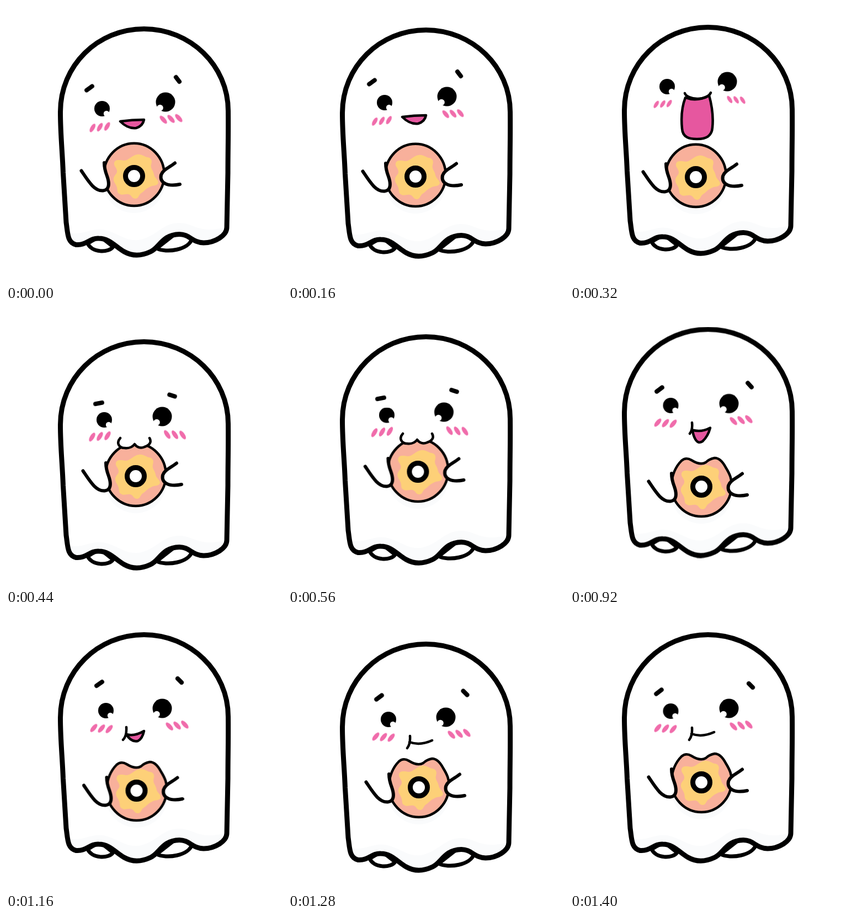
Recreate the animation shown at these times as an HTML page. Size 500 px wide and 500 px high, loop 1600 ms.

```html
<!DOCTYPE html>
<html lang="en">
<head>
<meta charset="utf-8">
<title>Ghost eating a donut</title>
<style>
html, body { margin: 0; width: 100%; height: 100%; overflow: hidden; background: #fff; }
svg { display: block; width: 100vw; height: 100vh; }

.line { fill: none; stroke: #000; stroke-linecap: round; stroke-linejoin: round; }
.white { fill: #fff; }
.tongue { fill: #e6579f; }
.shade { fill: #fafbfc; }
.cheek { fill: #f06cab; }

/* every part holds its pose until the next key */
.part { animation: 1600ms step-end infinite; }
#body { animation-name: body; }
#eyeL { animation-name: eyeL; }
#eyeR { animation-name: eyeR; }
#brows { animation-name: brows; }
#browL { animation-name: browL; }
#browR { animation-name: browR; }
#cheekL { animation-name: cheekL; }
#cheekR { animation-name: cheekR; }
#snack { animation-name: snack; }
#mouth { animation-name: mouth; }
#whole { animation-name: whole; }
#bitten { animation-name: bitten; }
#grin { animation-name: grin; }
#gape { animation-name: gape; }
#bite { animation-name: bite; }
#chew { animation-name: chew; }
#munch { animation-name: munch; }
#smile { animation-name: smile; }

@keyframes body {
  0% { transform: translateY(2px) }
  10% { transform: translateY(4px) }
  15% { transform: translateY(1px) }
  20% { transform: translateY(-1px) }
  27.5% { transform: translateY(18px) }
  35% { transform: translateY(9px) }
  42.5% { transform: none }
  50% { transform: translateY(14px) }
  57.5% { transform: translateY(-4.5px) }
  65% { transform: translateY(13px) }
  72.5% { transform: translateY(-2px) }
  80% { transform: translateY(15px) }
  87.5%, 100% { transform: translateY(-2px) }
}
@keyframes eyeL {
  0% { transform: translate(174px, 186px) }
  10% { transform: translate(175px, 175px) }
  15% { transform: translate(175px, 160px) }
  20% { transform: translate(176px, 146px) }
  27.5% { transform: translate(178px, 199px) }
  35% { transform: translate(179px, 190.5px) }
  42.5% { transform: translate(182px, 178px) }
  50% { transform: translate(182px, 191px) }
  57.5% { transform: translate(182.5px, 173px) }
  65% { transform: translate(182px, 190px) }
  72.5% { transform: translate(181px, 175px) }
  80% { transform: translate(182px, 191px) }
  87.5%, 100% { transform: translate(182.5px, 176px) }
}
@keyframes eyeR {
  0% { transform: translate(289px, 174px) }
  10% { transform: translate(288px, 164px) }
  15% { transform: translate(286px, 150px) }
  20% { transform: translate(285px, 137px) }
  27.5% { transform: translate(283px, 193px) }
  35% { transform: translate(282.5px, 185px) }
  42.5% { transform: translate(288px, 173px) }
  50% { transform: translate(288px, 186px) }
  57.5% { transform: translate(288px, 169.5px) }
  65% { transform: translate(286px, 186px) }
  72.5% { transform: translate(283px, 171px) }
  80% { transform: translate(286px, 187px) }
  87.5%, 100% { transform: translate(288px, 171px) }
}
@keyframes brows { 0% { opacity: 1 } 15% { opacity: 0 } 27.5%, 100% { opacity: 1 } }
@keyframes browL {
  0% { transform: translate(151px, 149px) rotate(-36deg) }
  10% { transform: translate(152px, 138px) rotate(-36deg) }
  27.5% { transform: translate(168px, 169px) rotate(-11deg) }
  35% { transform: translate(168px, 160px) rotate(-11deg) }
  42.5% { transform: translate(161px, 142.5px) rotate(-38deg) }
  50% { transform: translate(161px, 156px) rotate(-36deg) }
  57.5% { transform: translate(162px, 144px) rotate(-37deg) }
  65% { transform: translate(165px, 151px) rotate(-35deg) }
  72.5% { transform: translate(169px, 126.5px) rotate(-35deg) }
  80% { transform: translate(165px, 151px) rotate(-37deg) }
  87.5%, 100% { transform: translate(161px, 141px) rotate(-38deg) }
}
@keyframes browR {
  0% { transform: translate(311px, 133px) rotate(53deg) }
  10% { transform: translate(310px, 123px) rotate(53deg) }
  27.5% { transform: translate(301px, 155px) rotate(18deg) }
  35% { transform: translate(301px, 146.5px) rotate(18deg) }
  42.5% { transform: translate(327.5px, 131.5px) rotate(45deg) }
  50% { transform: translate(327px, 146px) rotate(46deg) }
  57.5% { transform: translate(325.5px, 136px) rotate(48deg) }
  65% { transform: translate(320px, 144px) rotate(46deg) }
  72.5% { transform: translate(314.5px, 120.5px) rotate(45deg) }
  80% { transform: translate(321px, 143px) rotate(45deg) }
  87.5%, 100% { transform: translate(327.5px, 129.5px) rotate(45deg) }
}
@keyframes cheekL {
  0% { transform: translate(170px, 219.5px) rotate(-6deg) scale(.95) }
  10% { transform: translate(170px, 208px) rotate(-6deg) scale(.92) }
  15% { transform: translate(169px, 193px) rotate(-5deg) scale(.88) }
  20% { transform: translate(168px, 177.5px) rotate(-4deg) scale(.84) }
  27.5% { transform: translate(170px, 229px) rotate(-5deg) }
  35% { transform: translate(170.5px, 221px) rotate(-5deg) }
  42.5% { transform: translate(173px, 209.5px) rotate(4deg) }
  50% { transform: translate(173px, 223px) rotate(4deg) }
  57.5% { transform: translate(173px, 205px) rotate(4deg) }
  65% { transform: translate(173px, 222px) rotate(4deg) }
  72.5% { transform: translate(173px, 207.5px) rotate(4deg) }
  80% { transform: translate(173px, 223px) rotate(4deg) }
  87.5%, 100% { transform: translate(173px, 207.5px) rotate(4deg) }
}
@keyframes cheekR {
  0% { transform: translate(299px, 204.5px) rotate(-6deg) }
  10% { transform: translate(299px, 195px) rotate(-4deg) scale(.95) }
  15% { transform: translate(300px, 183px) rotate(0deg) scale(.9) }
  20% { transform: translate(301px, 170px) rotate(3deg) scale(.84) }
  27.5% { transform: translate(306px, 226px) rotate(2deg) }
  35% { transform: translate(306.5px, 219px) rotate(2deg) }
  42.5% { transform: translate(310px, 204px) rotate(-7deg) }
  50% { transform: translate(310px, 217px) rotate(-7deg) }
  57.5% { transform: translate(310px, 199.5px) rotate(-7deg) }
  65% { transform: translate(310px, 216px) rotate(-7deg) }
  72.5% { transform: translate(310px, 202px) rotate(-7deg) }
  80% { transform: translate(310px, 217px) rotate(-7deg) }
  87.5%, 100% { transform: translate(310px, 202px) rotate(-7deg) }
}
@keyframes snack {
  0% { transform: translate(232px, 308px) }
  10% { transform: translate(231px, 309px) }
  15% { transform: translate(229px, 310px) }
  20% { transform: translate(228px, 310px) }
  27.5% { transform: translate(235px, 301px) }
  35% { transform: translate(235.4px, 293px) }
  42.5% { transform: translate(238px, 307px) }
  50% { transform: translate(238px, 317px) }
  57.5% { transform: translate(238px, 320px) }
  65% { transform: translate(237px, 323px) }
  72.5% { transform: translate(236.5px, 320px) }
  80% { transform: translate(237px, 314px) }
  87.5%, 100% { transform: translate(238px, 305px) }
}
@keyframes mouth {
  0% { transform: none }
  10% { transform: translateY(-8px) }
  15% { transform: translate(58px, 58px) scale(.75) }
  20% { transform: none }
  27.5% { transform: translate(-1px, 8px) }
  35% { transform: none }
  42.5% { transform: none }
  50% { transform: translateY(13px) }
  57.5% { transform: none }
  65% { transform: translateY(12px) }
  72.5% { transform: none }
  80% { transform: translateY(13px) }
  87.5%, 100% { transform: translateY(-2px) }
}
@keyframes whole { 0% { opacity: 1 } 42.5%, 100% { opacity: 0 } }
@keyframes bitten { 0% { opacity: 0 } 42.5%, 100% { opacity: 1 } }
@keyframes grin { 0% { opacity: 1 } 15%, 100% { opacity: 0 } }
@keyframes gape { 0% { opacity: 0 } 15% { opacity: 1 } 27.5%, 100% { opacity: 0 } }
@keyframes bite { 0% { opacity: 0 } 27.5% { opacity: 1 } 42.5%, 100% { opacity: 0 } }
@keyframes chew {
  0% { opacity: 0 } 42.5% { opacity: 1 } 57.5% { opacity: 0 }
  65% { opacity: 1 } 72.5% { opacity: 0 } 80%, 100% { opacity: 1 }
}
@keyframes munch { 0% { opacity: 0 } 57.5% { opacity: 1 } 65%, 100% { opacity: 0 } }
@keyframes smile { 0% { opacity: 0 } 72.5% { opacity: 1 } 80%, 100% { opacity: 0 } }
</style>
</head>
<body>
<svg viewBox="0 0 500 500">
  <defs>
    <path id="shape" d="M98.5 190C98.5 106 166 39.5 250 39.5C334 39.5 402.5 106 402.5 188C403 230 402 260 402 300L400 399C400 414 378 427 358 427C336 426 333 411.5 314 411.5C283 412 278 436 262 443C245 451 228 451 214 443C198 434 188 419 168 419C151 418 146 432 127 430.5C111 427 112 410 109 390L103.5 300C102 260 98.5 230 98.5 190Z"/>
    <clipPath id="inside"><use href="#shape"/></clipPath>
    <path id="icing" d="M-36 -24C-34 -31 -26 -29 -18 -28C-10 -28 -4 -38 6 -39C14 -40 18 -35 24 -34C32 -33 33 -27 31 -21C29 -14 35 -10 36 -3C37 4 44 6 44 12C42 19 34 16 28 20C21 23 18 28 13 31C8 34 9 40 3 41C-5 41 -4 34 -10 33C-17 32 -21 36 -27 32C-32 29 -29 24 -32 18C-34 13 -38 10 -37 4C-36 -2 -30 -4 -31 -10C-32 -16 -37 -18 -36 -24Z"/>
    <g id="blush" class="cheek">
      <ellipse rx="3.9" ry="9" transform="translate(-14) rotate(36)"/>
      <ellipse rx="3.9" ry="9" transform="rotate(36)"/>
      <ellipse rx="3.9" ry="9" transform="translate(14) rotate(36)"/>
    </g>
  </defs>

  <g id="body" class="part">
    <g class="line" stroke-width="7" style="fill:#fff">
      <path d="M148 428C155 445 186 446 194 434L170 415Z"/>
      <path d="M273 437C290 446 332 440 337 419L310 408Z"/>
    </g>
    <use href="#shape" class="white"/>
    <path class="shade" clip-path="url(#inside)" d="M100 405C135 419 150 399 176 403C205 409 218 427 245 421C275 413 284 391 314 391C342 391 350 415 410 395V470H100Z"/>
    <use href="#shape" class="line" stroke-width="9"/>
  </g>

  <g id="eyeL" class="part">
    <circle r="14"/>
    <circle class="white" cx="8" cy="9" r="5.2"/>
  </g>
  <g id="eyeR" class="part">
    <circle r="17.5"/>
    <circle class="white" cx="-10" cy="10.5" r="5.8"/>
  </g>
  <g id="brows" class="part line" stroke-width="8">
    <path id="browL" class="part" d="M-6 0H6"/>
    <path id="browR" class="part" d="M-5 0H5"/>
  </g>
  <use id="cheekL" class="part" href="#blush"/>
  <g id="cheekR" class="part"><use href="#blush" transform="scale(-1 1)"/></g>

  <g id="snack" class="part">
    <circle class="shade" cy="11" r="56"/>
    <g fill="#f8b09b" stroke="#000" stroke-width="4.5" stroke-linejoin="round">
      <ellipse id="whole" class="part" cy="-2.6" rx="54.7" ry="56.6"/>
      <path id="bitten" class="part" d="M0 54C-31 54 -54.7 28 -54.7 -3C-53 -22 -46 -37 -36 -47Q-28 -54 -18 -48Q-2 -38 8 -44Q14 -50 24 -52Q35 -52 44 -35C52 -22 55 -14 54.7 -3C54.7 28 31 54 0 54Z"/>
    </g>
    <use href="#icing" fill="#fdd078"/>
    <circle r="15.5" fill="#fff" stroke="#000" stroke-width="9"/>
    <g class="line" stroke-width="6" style="fill:#fff">
      <path d="M-95.5 -9.5C-83 9 -72 28 -56 26.5C-45 25.5 -44 14 -49 0Q-54 -13 -54 -24"/>
      <path d="M74 -23.5C62 -14 53 -12 49 -2C46 12 60 20 83 15"/>
    </g>
  </g>

  <g id="mouth" class="part line" stroke-width="4.5">
    <path id="grin" class="part tongue" d="M207 209Q228 206 250 206Q248 217 236 221Q221 223 207 209Z"/>
    <g id="gape" class="part">
      <path class="tongue" d="M209 166C202 184 201 202 203 222C204 238 216 241 230 241C246 241 257 236 258 220C260 200 257 180 252 162Q230 174 209 166Z"/>
      <path d="M208 158C212 170 248 173 255 157"/>
    </g>
    <path id="bite" class="part white" d="M208 224C200 233 206 242 216 242C225 243 231 239 234 235C238 241 245 243 252 240C264 236 264 229 261 224"/>
    <path id="chew" class="part" d="M221 208Q222 222 216 230M220 219Q239 226 261 216"/>
    <g id="munch" class="part">
      <path class="tongue" d="M222 217.5Q238 222 254 213.5Q250 229 240 238Q232 243 227 234Q223 227 222 217.5Z"/>
      <path d="M221 204Q222.500 217 217 224"/>
    </g>
    <g id="smile" class="part">
      <path class="tongue" d="M218 218Q233 222 250 212Q247 226 239 230Q227 233 218 218Z"/>
      <path d="M218 205Q219 221 212 228"/>
    </g>
  </g>
</svg>
</body>
</html>
```
